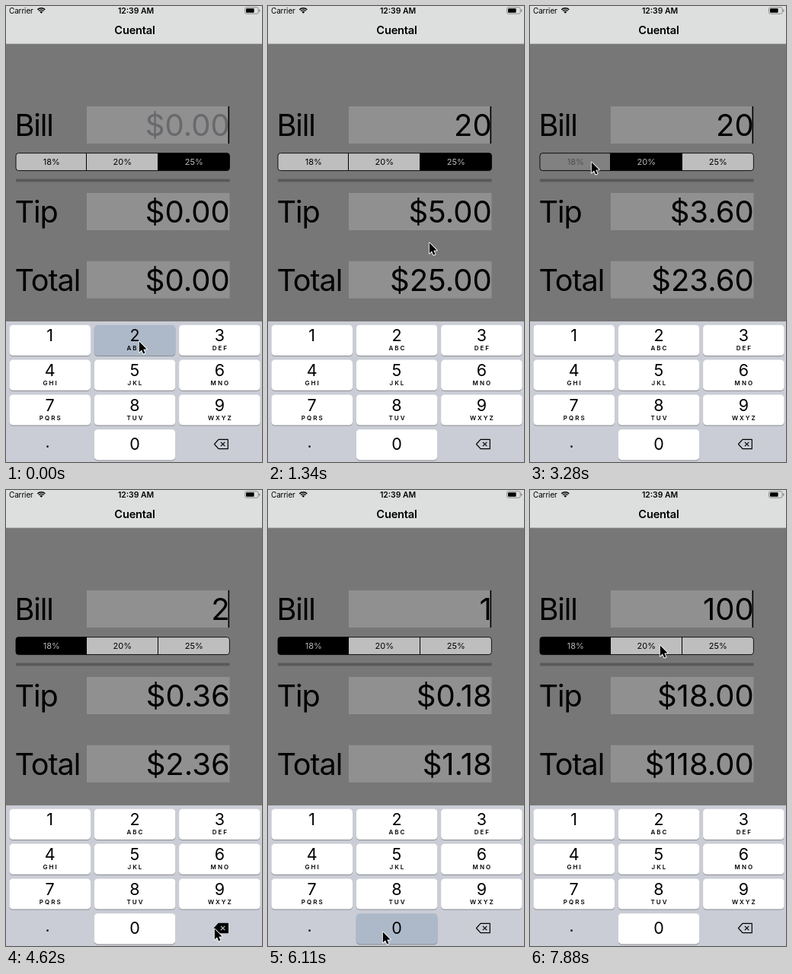
Animation of 336x600 px, one loop 8000 ms. Source, as an HTML page with a canvas:

```html
<!DOCTYPE html>
<html lang="en">
<head>
<meta charset="utf-8">
<title>Tip calculator</title>
<style>
html, body { margin: 0; width: 100%; height: 100%; overflow: hidden; background: #777; }
canvas { display: block; width: 336px; height: 600px; }
</style>
</head>
<body>
<canvas id="stage"></canvas>
<script>
const W = 336, H = 600, LOOP = 8000, HOLD = 140, LEAD = 80;
const canvas = document.getElementById('stage');
const ratio = window.devicePixelRatio || 1;
canvas.width = W * ratio;
canvas.height = H * ratio;
const ctx = canvas.getContext('2d');
const FONT = 'Inter, Roboto, "Liberation Sans", sans-serif';
const PERCENTS = [18, 20, 25];
const LETTERS = ' , ,ABC,DEF,GHI,JKL,MNO,PQRS,TUV,WXYZ'.split(',');

// what is tapped, when and where; an empty name only moves the pointer
const TAPS = [
  { at: 0, name: '2', x: 174, y: 440 },
  { at: 740, name: '0', x: 168, y: 577 },
  { at: 1420, name: '', x: 211, y: 310 },
  { at: 1930, name: '20%', x: 178, y: 204 },
  { at: 3130, name: '18%', x: 80, y: 204 },
  { at: 4500, name: 'del', x: 273, y: 576 },
  { at: 4850, name: 'del', x: 273, y: 576 },
  { at: 5480, name: '1', x: 76, y: 438 },
  { at: 6040, name: '0', x: 150, y: 580 },
  { at: 6250, name: '0', x: 150, y: 580 },
  { at: 7700, name: '', x: 170, y: 203 }
];

const clamp = v => Math.max(0, Math.min(1, v));
const mix = (a, b, k) => a + (b - a) * k;
const smooth = k => k * k * (3 - 2 * k);
const gray = v => `rgb(${Math.round(v)},${Math.round(v)},${Math.round(v)})`;

// replay the taps up to t; erasing acts on press, the rest on release
function stateAt(t) {
  const s = { bill: '', edited: 0, rate: 25, previous: 25, switched: -LOOP, held: '' };
  for (const { at, name } of TAPS) {
    if (t >= at && t < at + HOLD) s.held = name;
    const fires = name === 'del' ? at : at + HOLD;
    if (!name || t < fires) continue;
    if (name.endsWith('%')) {
      s.previous = s.rate;
      s.rate = parseInt(name);
      s.switched = fires;
    } else {
      s.bill = name === 'del' ? s.bill.slice(0, -1) : s.bill + name;
      s.edited = fires;
    }
  }
  return s;
}

function pointerAt(t) {
  const i = TAPS.findIndex(p => p.at - LEAD > t);
  if (i < 1) return TAPS[i < 0 ? TAPS.length - 1 : 0];
  const a = TAPS[i - 1], b = TAPS[i];
  const travel = Math.min(600, (b.at - a.at) * 0.4);
  const k = smooth(clamp(1 - (b.at - LEAD - t) / travel));
  return { x: mix(a.x, b.x, k), y: mix(a.y, b.y, k) };
}

function rect(x, y, w, h, fill) {
  ctx.fillStyle = fill;
  ctx.fillRect(x, y, w, h);
}

function round(x, y, w, h, r) {
  ctx.beginPath();
  ctx.roundRect(x, y, w, h, r);
}

function text(str, x, y, size, { color = '#000', align = 'left', weight = 400, space = 0 } = {}) {
  ctx.font = `${weight} ${size}px ${FONT}`;
  ctx.letterSpacing = space + 'px';
  ctx.textAlign = align;
  ctx.fillStyle = color;
  ctx.fillText(str, x, y);
}

function poly(points) {
  ctx.beginPath();
  points.forEach(([x, y]) => ctx.lineTo(x, y));
  ctx.closePath();
}

function header() {
  rect(0, 0, W, 50, '#dcdfdd');
  rect(0, 49.5, W, 0.7, '#a2a3a2');
  text('Carrier', 4, 9.8, 10, { space: -0.15 });
  text('12:39 AM', 170.5, 9.8, 10.4, { align: 'center', weight: 600 });
  text('Cuental', 169, 37, 14.6, { align: 'center', weight: 600, space: -0.2 });

  ctx.strokeStyle = ctx.fillStyle = '#000';
  ctx.lineWidth = 1.5;
  const sweep = r => ctx.arc(46.3, 9.8, r, -Math.PI * 0.75, -Math.PI * 0.25);
  for (const r of [7, 4.6]) {
    ctx.beginPath();
    sweep(r);
    ctx.stroke();
  }
  ctx.beginPath();
  ctx.moveTo(46.3, 9.8);
  sweep(2.8);
  ctx.fill();

  ctx.lineWidth = 0.8;
  ctx.strokeStyle = '#777';
  round(313.6, 1.8, 17.6, 8.4, 2);
  ctx.stroke();
  ctx.fillStyle = '#000';
  round(315, 3.2, 10.6, 5.6, 1);
  ctx.fill();
  round(332.2, 4.5, 1.2, 3, 0.6);
  ctx.fillStyle = '#777';
  ctx.fill();
}

function row(label, value, top, color = '#000') {
  rect(106, top, 187.5, 49, '#909090');
  text(label, 11.5, top + 39, 39.6, { space: -1.1 });
  text(value, 293.7, top + 39, 40, { align: 'right', color });
}

function segments(t, s) {
  const k = clamp((t - s.switched) / HOLD);
  const width = 93.6;
  ctx.save();
  round(13, 193.5, 280.5, 23, 3.5);
  ctx.clip();
  PERCENTS.forEach((p, i) => {
    const x = Math.round(12.5 + i * width);
    let back = 190, ink = 0;
    if (s.held === p + '%') {
      back = 140;
      ink = 70;
    } else if (p === s.rate) {
      back = mix(140, 0, k);
      ink = mix(70, 185, k);
    } else if (p === s.previous) {
      back = mix(0, 190, k * k);
      ink = mix(185, 0, k * k);
    }
    rect(x, 193, width + 1, 24, gray(back));
    if (i) rect(x - 1, 193, 1, 24, '#000');
    text(p + '%', x + width / 2, 209, 11, { align: 'center', color: gray(ink) });
  });
  ctx.restore();
  ctx.strokeStyle = '#000';
  ctx.lineWidth = 0.9;
  round(13, 193.6, 280.4, 23, 3.5);
  ctx.stroke();
}

function key(label, x, y, down) {
  round(x, y + 1, 106.5, 40.2, 4.5);
  ctx.fillStyle = '#898b8f';
  ctx.fill();
  round(x, y, 106.5, 40.2, 4.5);
  ctx.fillStyle = down ? '#adb9c9' : '#fff';
  ctx.fill();
  const mid = x + 53.2;
  text(label, mid, y + (label === '0' ? 26.5 : 21.5), 21.5, { align: 'center' });
  text(LETTERS[+label], mid + 1, y + 33.2, 8, { align: 'center', weight: 600, space: 2 });
}

function backspace(down) {
  poly([[273.5, 576.5], [279, 570.3], [291.3, 570.3], [291.3, 582.7], [279, 582.7]]);
  ctx.lineJoin = 'round';
  ctx.lineWidth = 1.2;
  ctx.strokeStyle = ctx.fillStyle = '#000';
  if (down) ctx.fill();
  ctx.stroke();
  ctx.strokeStyle = down ? '#cacdd5' : '#000';
  ctx.beginPath();
  for (const d of [-1, 1]) {
    ctx.moveTo(281.9, 576.5 - 2.7 * d);
    ctx.lineTo(287.3, 576.5 + 2.7 * d);
  }
  ctx.stroke();
}

function keypad(held) {
  rect(0, 415, W, 185, '#cacdd5');
  for (let n = 0; n < 10; n++) {
    const cell = n ? n - 1 : 10;
    const x = 4.5 + (cell % 3) * 111.3;
    const y = 419.8 + Math.floor(cell / 3) * 45.8;
    key(String(n), x, y, held === String(n));
  }
  text('.', 54.5, 581, 21, { align: 'center' });
  backspace(held === 'del');
}

function caret(age) {
  const phase = age % 1000;
  ctx.globalAlpha = 1 - clamp((phase - 570) / 50) * clamp((910 - phase) / 50);
  rect(291.5, 132, 1.7, 49, '#000');
  ctx.globalAlpha = 1;
}

function pointer({ x, y }) {
  ctx.save();
  ctx.translate(x, y);
  poly([[0.8, 1.6], [0.8, 15.6], [4, 12.6], [6.2, 17.6], [8.5, 16.6], [6.3, 11.7], [10.6, 11.5]]);
  ctx.lineJoin = 'round';
  ctx.lineWidth = 1.8;
  ctx.strokeStyle = '#fff';
  ctx.stroke();
  ctx.fillStyle = '#000';
  ctx.fill();
  ctx.restore();
}

function draw(t) {
  const s = stateAt(t);
  const tip = s.bill * s.rate / 100;
  ctx.setTransform(ratio, 0, 0, ratio, 0, 0);
  rect(0, 0, W, H, '#777');
  header();
  row('Bill', s.bill || '$0.00', 132, s.bill ? '#000' : '#69696d');
  row('Tip', '$' + tip.toFixed(2), 246);
  row('Total', '$' + (+s.bill + tip).toFixed(2), 335.7);
  caret(t - s.edited);
  segments(t, s);
  rect(13, 227.6, 280.5, 3.8, '#595959');
  keypad(s.held);
  pointer(pointerAt(t));
}

const start = performance.now();
function tick() {
  draw((performance.now() - start) % LOOP);
  requestAnimationFrame(tick);
}
tick();
</script>
</body>
</html>
```
